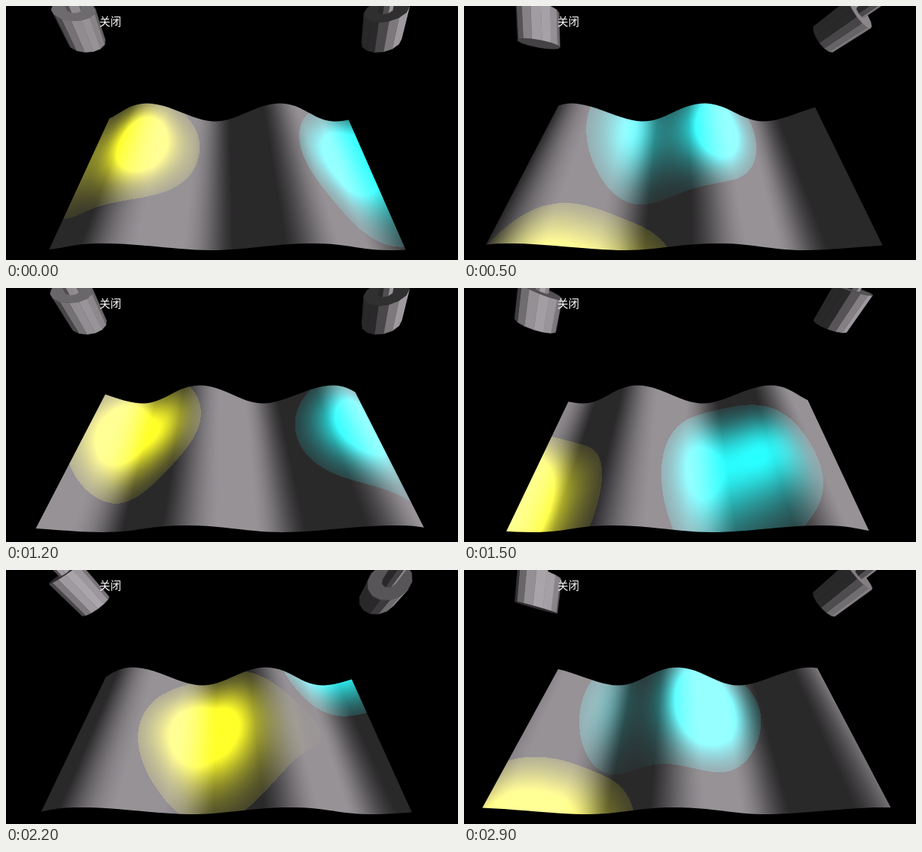
An HTML page with a canvas that plays this animation: 600x338 px, repeating every 3 s.

```html
<!DOCTYPE html>
<html lang="zh">
<head>
<meta charset="utf-8">
<style>
  html, body { margin: 0; width: 100%; height: 100%; overflow: hidden; background: #000; }
  canvas, svg { position: absolute; left: 0; top: 0; display: block; }
  text { font: 14.5px "Noto Sans CJK SC", "Noto Sans CJK", sans-serif; fill: #fff; }
</style>
</head>
<body>
<canvas id="stage" width="600" height="338"></canvas>
<svg width="600" height="338" viewBox="0 0 600 338"><text x="124" y="25.5">关闭</text></svg>
<script>
const W = 600, H = 338, LOOP = 3000, STEP = 100;
const ctx = document.getElementById('stage').getContext('2d');

// Camera pitch (sin, cos), focal length, and its distance to the back edge.
const S = 0.796, C = 0.605, F = 277, DEPTH = 41.26, RISE = 4;
// Sheet: x from LEFT to RIGHT, z from 0 (back) to LEN (front).
const LEFT = -25, RIGHT = 24, LEN = 23.6, AMP = 2.61, K = 2 * Math.PI / 25;
const SKEW = 0.025, SLOPE = AMP * K, RAD = Math.PI / 180;
const TOP = 124, BOTTOM = 329;

// Light from the right, front and above; spots swing on a cone.
const SUN = [0.7, 0.32, 0.64];
const SWING = 27.5 * RAD, CUT = Math.cos(27.8 * RAD), FALLOFF = 18, POWER = 293;

// at: place; lean, start and speed in degrees.
const lamps = [
  { at: [-12.4, 22.1, 10.8], lean: 18.5, start: 119, speed: 290, rgb: [1, 1, 0] },
  { at: [12.4, 22.1, 10.8], lean: -17.5, start: 331, speed: -295, rgb: [0, 1, 1] }
];

const sheet = document.createElement('canvas');
sheet.width = W;
sheet.height = BOTTOM - TOP;
const sheetCtx = sheet.getContext('2d');
const pixels = sheetCtx.createImageData(W, BOTTOM - TOP);

const dot = (a, b) => a[0] * b[0] + a[1] * b[1] + a[2] * b[2];
const cross = (a, b) => [
  a[1] * b[2] - a[2] * b[1],
  a[2] * b[0] - a[0] * b[2],
  a[0] * b[1] - a[1] * b[0]
];
const add = (p, d, k) => p.map((v, i) => v + d[i] * k);
const unit = a => a.map(v => v / Math.hypot(...a));

function project([x, h, z]) {
  const d = DEPTH - C * z - S * h;
  return [300 + F * x / d, 169 - F * (RISE - S * z + C * h) / d];
}

// World place of the eye: depth and rise are both zero there.
const EYE = [0, S * DEPTH - C * RISE, C * DEPTH + S * RISE];

// A swinging direction around a mean that leans along z.
function lampAxis(lamp, t) {
  const a = (lamp.start + lamp.speed * t) * RAD, b = lamp.lean * RAD;
  const y = -Math.cos(SWING), z = -Math.sin(SWING) * Math.sin(a);
  return [
    Math.sin(SWING) * Math.cos(a),
    y * Math.cos(b) + z * Math.sin(b),
    z * Math.cos(b) - y * Math.sin(b)
  ];
}

function shadeSheet(crest, axes) {
  const data = pixels.data;
  for (let y = TOP; y < BOTTOM; y++) {
    const p = (y + 0.5 - 169) / F;
    for (let x = 20; x < 575; x++) {
      const r = (x + 0.5 - 300) / F;
      let h = 0, X = 0, z = 0, phase = 0;
      for (let i = 0; i < 11; i++) {
        z = (RISE + C * h + p * (DEPTH - S * h)) / (C * p + S);
        X = r * (DEPTH - C * z - S * h);
        phase = K * (X - crest - SKEW * z);
        h = AMP * Math.cos(phase);
      }
      const tilt = SLOPE * Math.sin(phase), n = Math.hypot(tilt, 1);
      const sun = Math.max(0, (tilt * SUN[0] + SUN[1]) / n);
      const base = 42 + Math.min(108, 178 * sun);
      const col = [base, base * 0.97, base];
      lamps.forEach((lamp, i) => {
        const dx = X - lamp.at[0], dy = h - lamp.at[1], dz = z - lamp.at[2];
        const len = Math.sqrt(dx * dx + dy * dy + dz * dz);
        const a = axes[i];
        const cone = (dx * a[0] + dy * a[1] + dz * a[2]) / len;
        if (cone < CUT) return;
        const facing = Math.max(0, -(tilt * dx + dy) / (n * len));
        const light = POWER * facing * Math.pow(cone, FALLOFF);
        for (let k = 0; k < 3; k++) col[k] += light * lamp.rgb[k];
      });
      const o = ((y - TOP) * W + x) * 4;
      data[o] = col[0];
      data[o + 1] = col[1];
      data[o + 2] = col[2];
      data[o + 3] = 255;
    }
  }
  sheetCtx.putImageData(pixels, 0, 0);
}

function trace(points) {
  ctx.beginPath();
  points.forEach(p => ctx.lineTo(...project(p)));
  ctx.closePath();
}

function drawSheet(crest, axes) {
  shadeSheet(crest, axes);
  const edge = z => Array.from({ length: RIGHT - LEFT + 1 }, (_, i) =>
    [LEFT + i, AMP * Math.cos(K * (LEFT + i - crest - SKEW * z)), z]);
  ctx.save();
  trace([...edge(0), ...edge(LEN).reverse()]);
  ctx.clip();
  ctx.drawImage(sheet, 0, TOP);
  ctx.restore();
}

function face(points, normal) {
  if (dot(normal, add(EYE, points[0], -1)) <= 0) return;
  const v = Math.round(42 + 128 * Math.max(0, dot(normal, SUN)));
  ctx.fillStyle = ctx.strokeStyle = `rgb(${v},${Math.round(v * 0.97)},${v})`;
  ctx.lineWidth = 0.5;
  trace(points);
  ctx.fill();
  ctx.stroke();
}

function prism(top, bottom, axis, radius, sides) {
  const u = unit(cross(axis, [0, 0, 1])), w = cross(axis, u);
  const out = i => {
    const a = i * 2 * Math.PI / sides;
    return u.map((v, k) => v * Math.cos(a) + w[k] * Math.sin(a));
  };
  const ring = c => Array.from({ length: sides }, (_, i) => add(c, out(i), radius));
  const a = ring(top), b = ring(bottom);
  for (let i = 0; i < sides; i++) {
    const j = (i + 1) % sides;
    face([a[i], a[j], b[j], b[i]], out(i + 0.5));
  }
  face(a, axis.map(v => -v));
  face(b, axis);
}

function drawLamp(lamp, axis) {
  const top = add(lamp.at, axis, -1.4), bottom = add(lamp.at, axis, 1.4);
  const rod = () => prism(add(top, axis, -3), top, axis, 0.47, 8);
  const body = () => prism(top, bottom, axis, 1.43, 14);
  const topSeen = dot(axis, add(EYE, top, -1)) < 0;
  (topSeen ? [body, rod] : [rod, body]).forEach(draw => draw());
}

function render(t) {
  const crest = 9 - 12.56 * t;
  const axes = lamps.map(lamp => lampAxis(lamp, t));
  ctx.fillStyle = '#000';
  ctx.fillRect(0, 0, W, H);
  drawSheet(crest, axes);
  lamps.forEach((lamp, i) => drawLamp(lamp, axes[i]));
}

let shown = -1, begin = null;
function tick(now) {
  if (begin === null) begin = now;
  const step = Math.floor(((now - begin) % LOOP) / STEP);
  if (step !== shown) {
    shown = step;
    render(step * STEP / 1000);
  }
  requestAnimationFrame(tick);
}
render(0);
requestAnimationFrame(tick);
</script>
</body>
</html>
```
